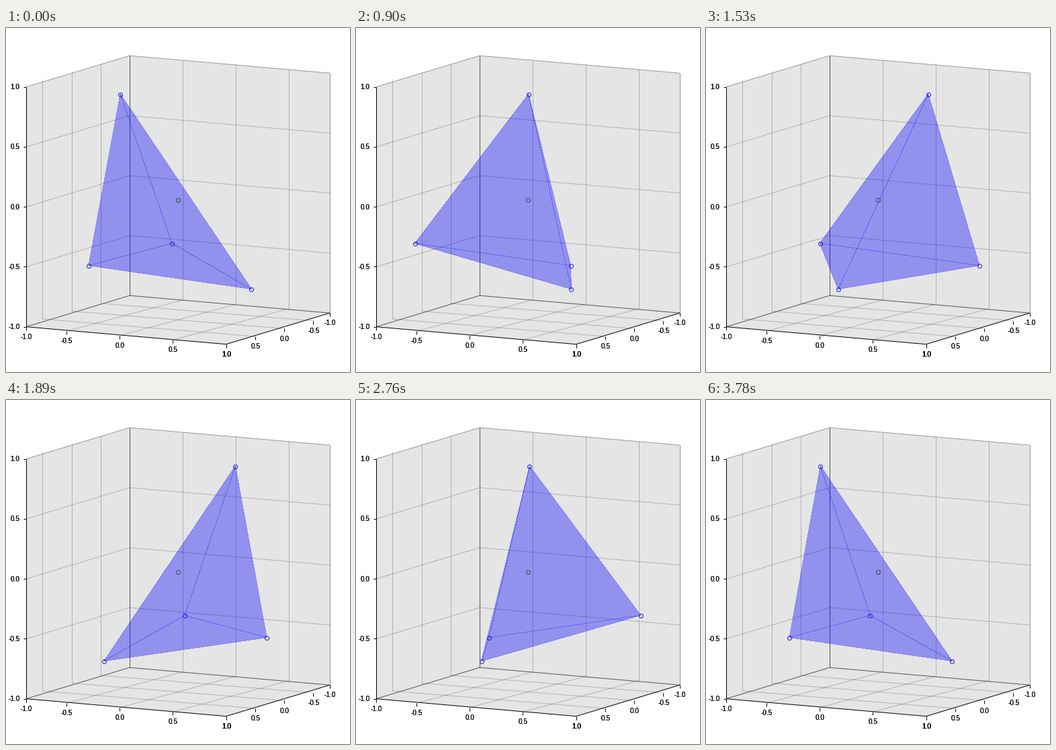
A matplotlib script for the animation above (3.81 s loop, 512x512 px).

```python
from itertools import combinations

import matplotlib.pyplot as plt
import numpy as np
from matplotlib.animation import FuncAnimation
from matplotlib.patches import Polygon

SIZE, DPI = 512, 64
PX = 72 / DPI  # points per pixel
FRAMES, INTERVAL, STEP = 127, 30, 0.05

# Box: back corner of the floor, its three edge vectors and the side limits
BACK = np.array([184, 397.7])
EX = np.array([316.5, 26])
EY = np.array([-172.9, 46.5])
EZ = np.array([0, -357])
LEFT, RIGHT = 30, 482

# Solid: x = CENTER + a cos(t) + b sin(t) at a fixed height
CENTER = 255.8
COS = np.array([-85.6, 109.4, -8.8, -132.8])
SIN = np.array([7.0, 57.0, -167.8, 73.3])
HEIGHTS = np.array([98, 388, 320, 353])

fig = plt.figure(figsize=(SIZE / DPI, SIZE / DPI), dpi=DPI, facecolor="white")
ax = fig.add_axes([0, 0, 1, 1])
ax.set_xlim(0, SIZE)
ax.set_ylim(SIZE - 0.5, -0.5)
ax.axis("off")


def point(x, y, z):
    """Project a box point; whatever leaves the side limits is pushed back."""
    px, py = BACK + x * EX + y * EY + z * EZ
    return np.array([np.clip(px, LEFT, RIGHT), py])


def line(p, q, color, alpha=1.0):
    ax.plot([p[0], q[0]], [p[1], q[1]], color=color, alpha=alpha,
            lw=PX, solid_capstyle="butt", zorder=2)


def label(x, y, value, align="center", passes=2):
    for _ in range(passes):
        ax.text(x, y + 3.5, f"{value:.1f}", ha=align, va="baseline",
                family="Liberation Sans", fontsize=10 * PX, color="black",
                zorder=4)


def wall(*corners):
    ax.add_patch(Polygon([point(*c) for c in corners], closed=True,
                         fc="#e5e5e5", ec="none", zorder=1))


def draw_box():
    wall((0, 0, 0), (1, 0, 0), (1, 0, 1), (0, 0, 1))
    wall((0, 0, 0), (0, 1, 0), (0, 1, 1), (0, 0, 1))
    wall((0, 0, 0), (1, 0, 0), (1, 1, 0), (0, 1, 0))

    for k in (0.25, 0.5, 0.75):
        for p, q in [
            ((k, 0, 0), (k, 0, 1)),
            ((k, 0, 0), (k, 1, 0)),
            ((0, k, 0), (0, k, 1)),
            ((0, k, 0), (1, k, 0)),
            ((0, 0, k), (1, 0, k)),
            ((0, 0, k), (0, 1, k)),
        ]:
            line(point(*p), point(*q), "black", 0.22)

    for p, q, color in [
        ((0, 0, 1), (1, 0, 1), "#999999"),
        ((0, 0, 1), (0, 1, 1), "#999999"),
        ((1, 0, 0), (1, 0, 1), "#999999"),
        ((0, 0, 0), (0, 0, 1), "#555555"),
        ((0, 0, 0), (1, 0, 0), "#555555"),
        ((0, 0, 0), (0, 1, 0), "#555555"),
        ((0, 1, 0), (0, 1, 1), "black"),
        ((0, 1, 0), (1, 1, 0), "black"),
        ((1, 1, 0), (1, 0, 0), "black"),
    ]:
        line(point(*p), point(*q), color)


def bottom_tick(p, value):
    line(p, p + [0, 5], "black")
    label(p[0] + 0.5, p[1] + 14.7, value)


def draw_ticks():
    for k in range(5):
        t, value = k / 4, -1 + k / 2
        x, y = point(0, 1, t)
        line((x - 4, y), (x, y), "black")
        label(x - 9.5, y, value, "right")
        bottom_tick(point(t, 1, 0), value)
        bottom_tick(point(1, t, 0), value)


draw_box()
draw_ticks()

faces = []
for ids in combinations(range(4), 3):
    patch = Polygon(np.zeros((3, 2)), closed=True, fc="blue", ec="none",
                    alpha=0.2, antialiased=False, zorder=5)
    ax.add_patch(patch)
    faces.append((list(ids), patch))

edges = []
for ids in combinations(range(4), 2):
    seam, = ax.plot([], [], color="blue", alpha=0.22, lw=0.7 * PX,
                    dashes=(5, 2), zorder=6)
    edges.append((list(ids), seam))

ring = dict(ls="none", marker="o", ms=6 * PX, mfc="none", mew=PX, zorder=7)
ax.plot(256.2, 255, mec="#444444", **ring)
dots, = ax.plot([], [], mec="#2020c8", **ring)


def update(i):
    t = STEP * i
    pts = np.column_stack([CENTER + COS * np.cos(t) + SIN * np.sin(t),
                           HEIGHTS])
    for ids, patch in faces:
        patch.set_xy(pts[ids])
    for ids, seam in edges:
        seam.set_data(*pts[ids].T)
    dots.set_data(*pts.T)
    return [p for _, p in faces] + [s for _, s in edges] + [dots]


anim = FuncAnimation(fig, update, frames=FRAMES, interval=INTERVAL,
                     repeat=True, repeat_delay=0, blit=False)
plt.show()
```
